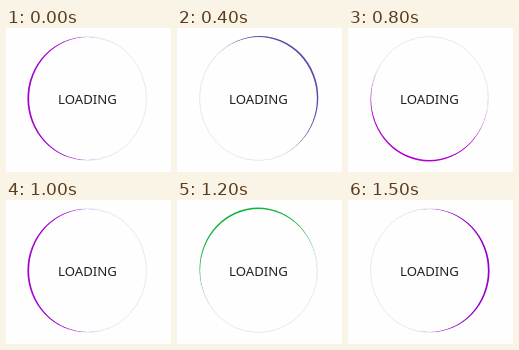
Recreate the animation shown at these times as an HTML page with a canvas. Size 165 by 144 pixels, loop 1600 ms.

```html
<!DOCTYPE html>
<html>
<head>
<meta charset="utf-8">
<style>
  html, body { margin: 0; overflow: hidden; background: #fefefe; }
  canvas { display: block; }
</style>
</head>
<body>
<canvas id="stage" width="165" height="144"></canvas>
<script>
const ctx = document.getElementById('stage').getContext('2d');
const LOOP = 1600, TURN = 1000, STEP = 100;
const CX = 81.5, CY = 70.5, RX = 59, RY = 62;

// Glow colour over one turn: [ms, r, g, b]
const stops = [
  [0, 165, 0, 205], [200, 18, 182, 62], [400, 100, 72, 168],
  [500, 150, 0, 200], [600, 188, 0, 218], [1000, 165, 0, 205]
];

function colorAt(t) {
  const i = stops.findIndex(s => s[0] > t);
  const a = stops[i - 1], b = stops[i];
  const k = (t - a[0]) / (b[0] - a[0]);
  return `rgb(${[1, 2, 3].map(c => a[c] + (b[c] - a[c]) * k)})`;
}

function ellipse(dx, dy, grow) {
  ctx.ellipse(CX + dx, CY + dy, RX + grow, RY + grow, 0, 0, 2 * Math.PI);
}

function draw(ms) {
  const t = ms % TURN;
  const angle = Math.PI + 2 * Math.PI * t / TURN;
  ctx.fillStyle = '#fefefe';
  ctx.fillRect(0, 0, 165, 144);

  ctx.beginPath();
  ellipse(0, 0, 0);
  ctx.strokeStyle = '#e9e8ee';
  ctx.lineWidth = 1;
  ctx.stroke();

  // Crescent: a shifted disc seen only outside the ring's inner edge
  ctx.save();
  ctx.beginPath();
  ctx.rect(0, 0, 165, 144);
  ellipse(0, 0, -0.6);
  ctx.clip('evenodd');
  ctx.beginPath();
  ellipse(1.7 * Math.cos(angle), 1.7 * Math.sin(angle), -0.6);
  ctx.fillStyle = colorAt(t);
  ctx.fill();
  ctx.restore();

  ctx.fillStyle = '#222';
  ctx.font = '13.2px "Noto Sans", sans-serif';
  ctx.textAlign = 'center';
  ctx.fillText('LOADING', CX, 76);
}

function frame(now) {
  draw(Math.floor(now % LOOP / STEP) * STEP);
  requestAnimationFrame(frame);
}
requestAnimationFrame(frame);
</script>
</body>
</html>
```
